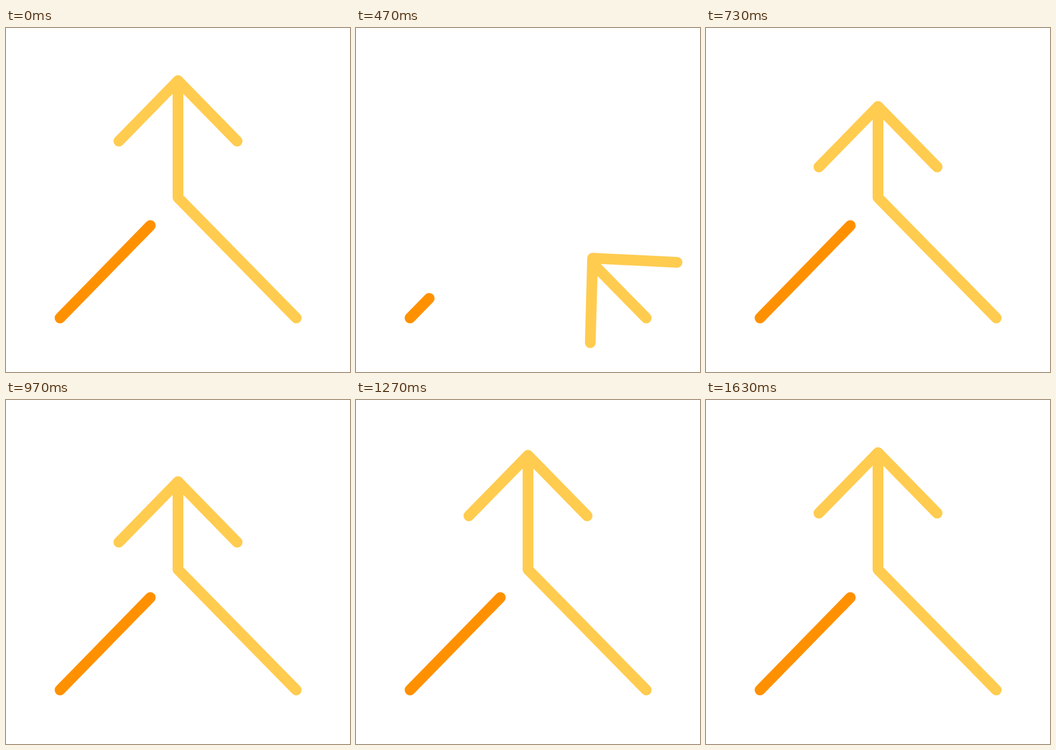
Write an HTML page that moves like this. It is 640 px wide and 640 px high and loops after 2000 ms.

```html
<!DOCTYPE html>
<html lang="en">
<head>
<meta charset="utf-8">
<title>Merge arrow</title>
<style>
  html, body { margin: 0; width: 100%; height: 100%; overflow: hidden; background: #fff; }
  svg { display: block; width: 100%; height: 100%; }
  path { fill: none; stroke: #ffcc50; stroke-width: 20; stroke-linecap: round; stroke-linejoin: round; }
  #branch { stroke: #ff9100; }
</style>
</head>
<body>
<svg viewBox="0 0 640 640">
  <path id="branch"/>
  <path id="stem"/>
  <path id="head" d="M-110 112.5L0 0L110 112.5"/>
</svg>
<script>
const LOOP = 2000, FPS = 30;
const [branch, stem, head] = ['branch', 'stem', 'head'].map(id => document.getElementById(id));

const START = [540, 539.5], BEND = [320, 315.5], TOP = 98;
const LOWER = Math.hypot(START[0] - BEND[0], START[1] - BEND[1]);
const FULL = LOWER + BEND[1] - TOP;

// Keys are [tick, value]; the curve rests at every turning point.
const reach = [[0, FULL], [8, 232], [12, 98], [14, 142.5], [16, 214], [22, FULL - 48],
  [25, FULL], [29.5, FULL - 56], [38, FULL - 5], [40, FULL]];
const turn = [[0, 0], [8, -41.4], [12, -44], [14, -42.8], [16, -42], [21, 0]];
const lift = [[0, 0], [8, -2], [12, 0], [14, -9.6], [16, -2], [20, 0]];
const grow = [[0, 1], [8, .445], [13, .19], [14, .2125], [21, 1]];

function slope(keys, i) {
  if (i === 0 || i === keys.length - 1) return 0;
  const rate = j => (keys[j + 1][1] - keys[j][1]) / (keys[j + 1][0] - keys[j][0]);
  const a = rate(i - 1), b = rate(i);
  return a * b > 0 ? 2 * a * b / (a + b) : 0;
}

function at(keys, t) {
  const i = keys.findIndex(k => k[0] > t) - 1;
  if (i < 0) return keys[keys.length - 1][1];
  const [t0, v0] = keys[i], [t1, v1] = keys[i + 1];
  const d = t1 - t0, s = (t - t0) / d, r = 1 - s;
  return v0 * r * r * (1 + 2 * s) + v1 * s * s * (1 + 2 * r)
    + d * s * r * (slope(keys, i) * r - slope(keys, i + 1) * s);
}

const mix = (a, b, k) => a.map((v, i) => v + (b[i] - v) * k);

function draw(ms) {
  const tick = Math.floor((ms % LOOP + 4) * FPS / 1000) % (LOOP * FPS / 1000);
  const len = at(reach, tick);
  const bent = len > LOWER;
  const tip = bent ? [BEND[0], BEND[1] - len + LOWER] : mix(START, BEND, len / LOWER);
  stem.setAttribute('d', `M${START}${bent ? 'L' + BEND : ''}L${tip}`);
  head.setAttribute('transform',
    `translate(${tip[0]} ${tip[1] + at(lift, tick)}) rotate(${at(turn, tick)})`);
  branch.setAttribute('d', `M100.5 539.5L${mix([100.5, 539.5], [268.5, 367.5], at(grow, tick))}`);
}

const begin = performance.now();
function loop() {
  draw(performance.now() - begin);
  requestAnimationFrame(loop);
}
loop();
</script>
</body>
</html>
```
